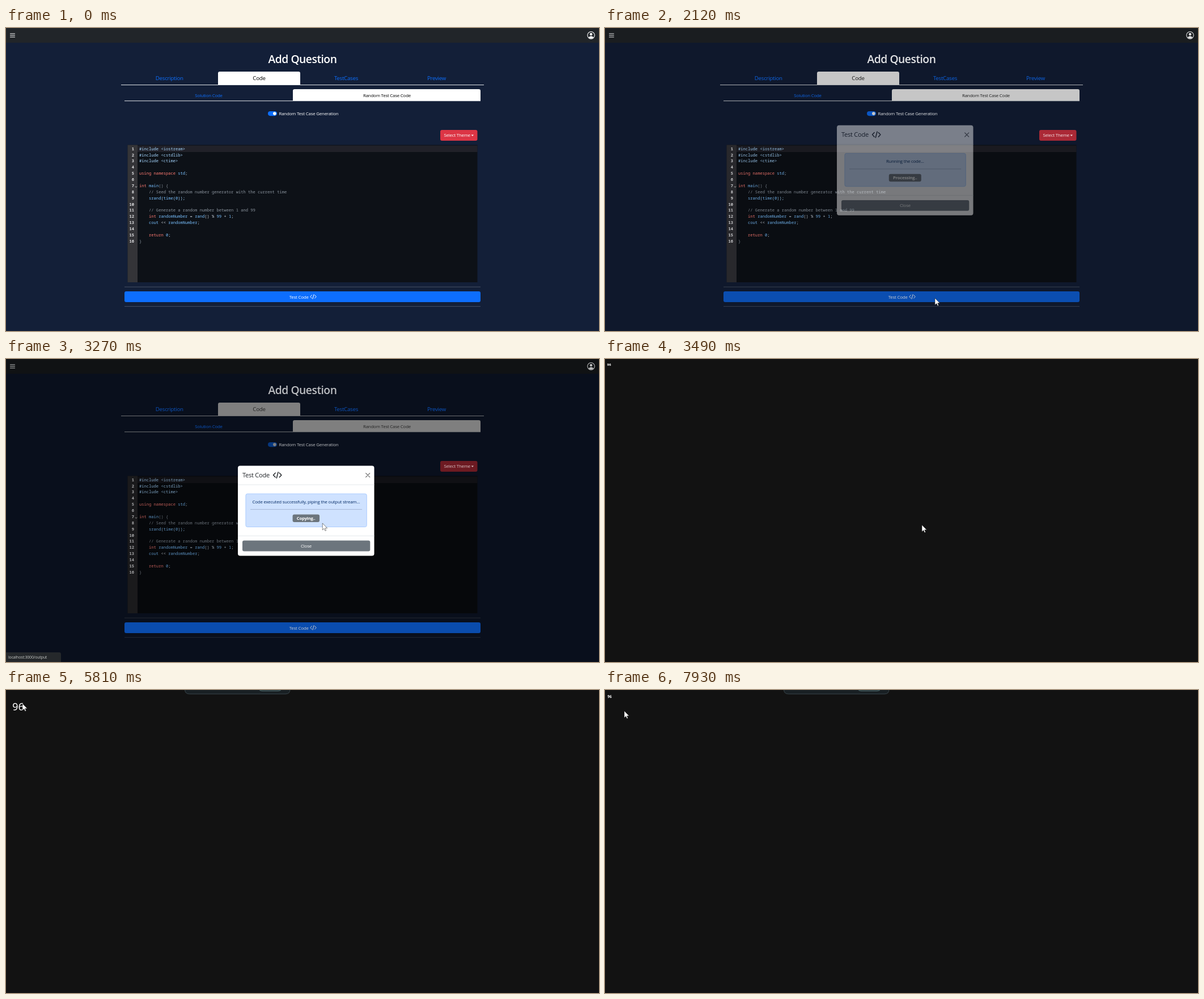
Write an HTML page that moves like this. It is 1046x535 px and loops after 8 s.

```html
<!DOCTYPE html>
<html lang="en">
<head>
<meta charset="utf-8">
<title>Add Question</title>
<style>
  html, body { margin: 0; width: 100%; height: 100%; overflow: hidden; background: #121212; }
  svg { display: block; width: 100vw; height: 100vh; }
  text { font-family: "Open Sans", "Noto Sans", sans-serif; font-size: 7.85px; letter-spacing: -.025em; white-space: pre; }
  .mid { text-anchor: middle; }
  .tab { font-size: 9.7px; }
  .link { fill: #0d6efd; }
  .mono { font-family: "Noto Sans Mono", "DejaVu Sans Mono", monospace; font-size: 7.11px; letter-spacing: 0; }
  .num { text-anchor: end; font-weight: 600; fill: #e4e4e6; }
  .k { fill: #ff7b72; }
  .v { fill: #79c0ff; }
  .s { fill: #a5d6ff; }
  .c { fill: #8b949e; }
  .p { fill: #c9d1d9; }
</style>
</head>
<body>
<svg viewBox="0 0 1046 535">
  <defs>
    <path id="tag" d="M-2.6-2.8-5.2 0-2.6 2.8M2.6-2.8 5.2 0 2.6 2.8M1-3.8-1 3.8" fill="none" stroke-linecap="round" stroke-linejoin="round"/>
  </defs>

  <g id="page">
    <rect width="1046" height="535" fill="#131f38"/>
    <rect width="1046" height="26" fill="#212529"/>
    <path d="M374 101V80q0-3 3-3H516q3 0 3 3V101ZM506 129V111q0-3 3-3H834q3 0 3 3V129Z" fill="#fff"/>
    <path d="M203 100.5H843M209 128.7H837" stroke="#dee2e6"/>
    <path d="M209 457.2H837M209 491.6H837" stroke="#4c566a" stroke-width=".9"/>
    <rect x="462" y="147" width="16" height="8.2" rx="4.1" fill="#0d6efd"/>
    <circle cx="473.8" cy="151.1" r="2.8" fill="#fff"/>
    <rect x="766" y="180" width="65.5" height="19" rx="3" fill="#dc3545"/>
    <rect x="214.5" y="206.5" width="617" height="242.5" fill="#0d1117"/>
    <rect x="214.5" y="206.5" width="17.5" height="242.5" fill="#343438"/>
    <rect x="232" y="207.5" width="599.5" height="11.5" fill="#212129"/>
    <rect id="shade" width="1046" height="535"/>

    <g id="labels" fill="#fff">
      <path d="M7.5 10H15.5M7.5 13H15.5M7.5 16H15.5" stroke="#fff" stroke-width="1.2" stroke-linecap="round"/>
      <circle cx="1032" cy="12.8" r="6.3" fill="none" stroke="#fff" stroke-width="1.1"/>
      <circle cx="1032" cy="11" r="2.3"/>
      <path d="M1027.8 16.6Q1032 11.8 1036.2 16.6 1032 20.4 1027.8 16.6Z"/>
      <text class="mid" x="523" y="62" style="font-size:19.3px;font-weight:600">Add Question</text>
      <text class="mid tab link" x="288.3" y="92.4">Description</text>
      <text class="mid tab" x="446.5" y="92.4" fill="#000">Code</text>
      <text class="mid tab link" x="600" y="92.4">TestCases</text>
      <text class="mid tab link" x="759.5" y="92.4">Preview</text>
      <text class="mid link" x="357.5" y="122">Solution Code</text>
      <text class="mid" x="672" y="122" fill="#000">Random Test Case Code</text>
      <text x="481.5" y="154">Random Test Case Generation</text>
      <text x="772.5" y="192.4">Select Theme</text>
      <path d="M820.6 188.4H825L822.8 190.9Z"/>
      <g id="code"></g>
      <path d="M227.9 279.6 229.5 281.3 231.1 279.6" fill="none" stroke="#ddd" stroke-width=".9"/>
    </g>

    <g id="run">
      <rect id="runBox" x="209" y="465" width="628" height="19" rx="3"/>
      <text class="mid" x="516.7" y="477.5" fill="#fff">Test Code</text>
      <use href="#tag" x="542" y="474.4" stroke="#fff" stroke-width="1"/>
    </g>

    <g id="modal">
      <rect x="409" y="188.5" width="240.5" height="159" rx="4" fill="#fff"/>
      <path d="M409 222H649.5M409 312.3H649.5" stroke="#dee2e6" stroke-width=".8"/>
      <text x="417" y="209" fill="#212529" style="font-size:11.1px">Test Code</text>
      <use href="#tag" transform="translate(478.7 205) scale(1.38)" stroke="#212529" stroke-width="1.05"/>
      <path d="M634.7 201.7 641.7 208.7M641.7 201.7 634.7 208.7" stroke="#666" stroke-width="1.2" stroke-linecap="round"/>
      <rect x="422.9" y="238" width="213.4" height="58.5" rx="3" fill="#cfe2ff" stroke="#9ec5fe" stroke-width=".8"/>
      <path d="M431 265.6H628" stroke="#9aaac8" stroke-width=".8"/>
      <text id="msg" class="mid" x="529.3" y="255.1" fill="#052c65"></text>
      <rect id="badge" y="274.5" height="13.5" rx="3" fill="#6c757d"/>
      <text id="state" class="mid" x="529.2" y="284.1" fill="#fff" style="font-weight:700;font-size:7.6px"></text>
      <rect x="417" y="320.6" width="225.3" height="18.8" rx="3" fill="#6c757d"/>
      <text class="mid" x="529.5" y="332.8" fill="#fff">Close</text>
    </g>
    <g id="status">
      <path d="M0 535V518H94q3 0 3 3V535Z" fill="#25282b"/>
      <text x="4" y="529" fill="#c4c7c5" style="font-size:7px">localhost:3000/output</text>
    </g>
  </g>

  <g id="output">
    <rect width="1046" height="535" fill="#121212"/>
    <text id="result" class="mono" fill="#fff">96</text>
    <g id="popup">
      <path d="M315.5-2V-1Q315.5 7 323.5 7H493Q501 7 501-1V-2Z" fill="#192024" stroke="#39454a" stroke-width="1"/>
      <path d="M445.5-2Q447 1.6 452 1.6H480Q485 1.6 486.5-2" fill="none" stroke="#56777a" stroke-width="1"/>
    </g>
  </g>

  <path id="cursor" d="M0 0V12L2.8 9.4 4.7 13.5 6.5 12.7 4.7 8.8H8.5Z" fill="#fff" stroke="#111" stroke-width=".5"/>
</svg>

<script>
const $ = id => document.getElementById(id);
const LOOP = 8000, OPEN = 2054, REPLY = 2330, LEAVE = 3470;

// Each line is a list of class:text runs separated by "|".
const CODE = [
  's:#include <iostream>', 's:#include <cstdlib>', 's:#include <ctime>', '',
  'k:using namespace |v:std|p:;', '',
  'k:int |v:main|c:() {',
  'c:    // Seed the random number generator with the current time',
  'v:    srand|s:(|v:time|s:(|v:0|s:));', '',
  'c:    // Generate a random number between 1 and 99',
  'k:    int |v:randomNumber |p:= |v:rand|p:() % |v:99 |p:+ |v:1|p:;',
  'v:    cout |p:<< |v:randomNumber|p:;', '',
  'k:    return |v:0|p:;', 'c:}'
];
const esc = s => s.replace(/</g, '&lt;').replace(/>/g, '&gt;');
$('code').innerHTML = CODE.map((line, i) => {
  const y = 215.7 + i * 10.87;
  const runs = line && line.split('|').map(r => `<tspan class="${r[0]}">${esc(r.slice(2))}</tspan>`).join('');
  return `<text class="mono num" x="226" y="${y}">${i + 1}</text><text class="mono" x="235" y="${y}">${runs}</text>`;
}).join('');

// Pointer path: time, x, y
const PATH = [
  [190, 426, 0], [430, 500, 190], [680, 593, 431], [940, 566, 262], [1300, 588, 462],
  [1480, 585, 480], [1770, 582, 477], [2130, 582, 477], [2450, 636, 366], [2590, 558, 290],
  [2900, 556, 281], [3400, 559, 293], [3600, 559, 293], [4000, 250, 150], [4370, 37, 51],
  [4450, 33, 48], [4700, 3, 4], [4920, 11, 10], [5190, 16, 18], [5450, 29, 24],
  [6780, 29, 24], [6790, 31, 27], [7510, 31, 27], [7850, 34, 37], [LOOP, 34, 37]
];
function pointer(t) {
  const i = Math.max(1, PATH.findIndex(p => p[0] > t));
  const [t0, x0, y0] = PATH[i - 1], [t1, x1, y1] = PATH[i];
  const f = clamp((t - t0) / (t1 - t0));
  return [x0 + (x1 - x0) * f, y0 + (y1 - y0) * f];
}

const clamp = v => Math.min(1, Math.max(0, v));
const easeOut = x => 1 - Math.pow(1 - x, 1.9);

const ZOOM = [67, 75, 80, 90, 100, 110, 125, 150, 175, 200, 250, 300, 400, 500];
const steps = (t, start, gap, max) => Math.min(max, Math.max(0, Math.floor((t - start) / gap) + 1));
function zoom(t) {
  const up = steps(t, 5255, 62, 12) + (t >= 6120);
  const down = steps(t, 6855, 64, 8) + steps(t, 7510, 95, 4);
  return ZOOM[up - down] / 500;
}

function attrs(el, o) {
  for (const k in o) el.setAttribute(k, o[k]);
}
const show = (id, on) => $(id).style.display = on ? '' : 'none';

function drawPage(t) {
  const fade = clamp((t - OPEN) / 150), slide = easeOut(clamp((t - OPEN) / 300));
  attrs($('shade'), { opacity: .5 * fade });
  attrs($('labels'), { opacity: 1 - .28 * fade });
  attrs($('run'), { opacity: 1 - .22 * clamp(fade * 2.3) });
  attrs($('runBox'), { fill: t > 1310 ? '#0b5ed7' : '#0d6efd' });
  attrs($('modal'), { opacity: fade, transform: `translate(0 ${-27 * (1 - slide)})` });
  const done = t >= REPLY, w = done ? 47.5 : 57;
  $('msg').textContent = done ? 'Code executed successfully, piping the output stream...' : 'Running the code...';
  $('state').textContent = done ? 'Copying..' : 'Processing..';
  attrs($('badge'), { x: 529.3 - w / 2, width: w });
  show('status', t >= 2700);
}

function drawOutput(t) {
  const k = zoom(t);
  attrs($('result'), {
    x: 27.5 * k, y: 91 * k,
    style: `font-size:${44 * k}px;font-weight:${k < .25 ? 700 : 400}`
  });
  show('popup', t >= 5255);
}

function draw(t) {
  const out = t >= LEAVE;
  show('page', !out);
  show('output', out);
  (out ? drawOutput : drawPage)(t);
  show('cursor', t >= 190);
  attrs($('cursor'), { transform: `translate(${pointer(t)})` });
}

const start = performance.now();
function tick() {
  draw((performance.now() - start) % LOOP);
  requestAnimationFrame(tick);
}
tick();
</script>
</body>
</html>
```
